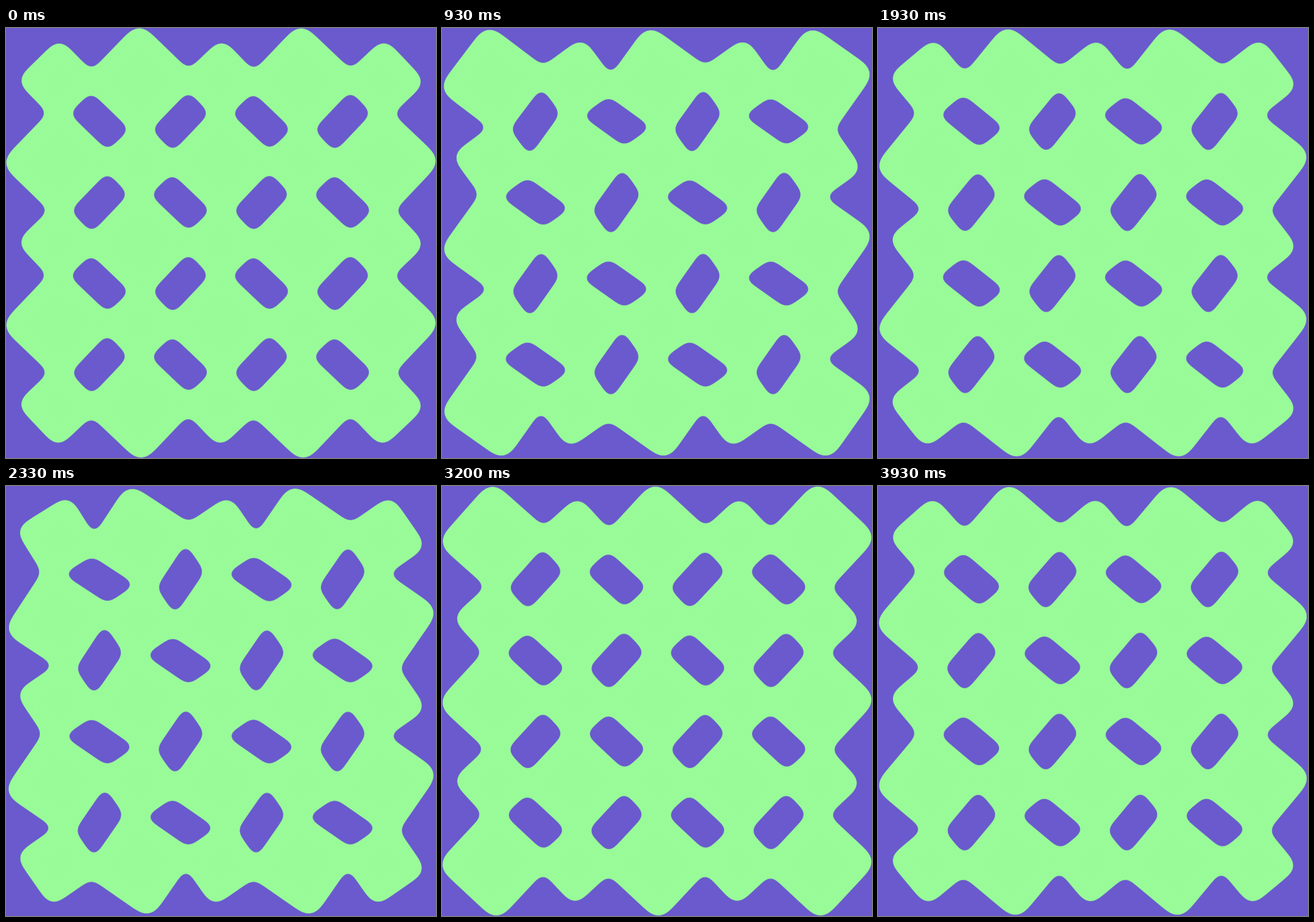
Animation of 748x748 px, one loop 4000 ms. Source, as an HTML page without scripts:

```html
<!DOCTYPE html>
<html lang="en">
<head>
<meta charset="utf-8">
<title>Swaying squares</title>
<style>
  html, body {
    margin: 0;
    width: 100%;
    height: 100%;
    overflow: hidden;
    background: #6a5acd;
  }
  .stage {
    position: relative;
    width: 100%;
    height: 100%;
    overflow: hidden;
    contain: strict;
  }
  svg { position: absolute; width: 0; height: 0; }
  .grid {
    position: absolute;
    left: 22px;
    top: 22px;
    display: grid;
    grid: repeat(5, 140.8px) / repeat(5, 140.8px);
    place-items: center;
    filter: url(#goo);
  }
  /* --dir: sway direction, --lead: head start near the top left */
  i {
    --dir: 1;
    --lead: 1ms;
    width: 122px;
    height: 122px;
    border-radius: 15%;
    background: #98fb98;
    animation: sway 4s cubic-bezier(.364, 0, .636, 1) calc(-3918ms - var(--lead)) infinite;
  }
  i:nth-child(odd) { --dir: -1; }
  i:nth-child(1) { --lead: 30ms; }
  i:nth-child(4n + 2):nth-child(-n + 6) { --lead: 17ms; }
  i:nth-child(4n + 3):nth-child(-n + 11) { --lead: 9ms; }
  i:nth-child(4n + 4):nth-child(-n + 16) { --lead: 5ms; }

  /* squares grow as they turn one way and shrink the other way */
  @keyframes sway {
    0%, 50.8%, 100% {
      transform: rotate(calc(var(--dir) * 45deg)) scale(calc(1 + var(--dir) * .166));
    }
    25.9% {
      transform: rotate(calc(var(--dir) * -42deg)) scale(calc(1 - var(--dir) * .155));
    }
    75.7% {
      transform: rotate(calc(var(--dir) * -45deg)) scale(calc(1 - var(--dir) * .166));
    }
  }
</style>
</head>
<body>
<div class="stage">
  <svg aria-hidden="true">
    <filter id="goo" color-interpolation-filters="sRGB">
      <feGaussianBlur stdDeviation="10"/>
      <feColorMatrix values="1 0 0 0 0  0 1 0 0 0  0 0 1 0 0  0 0 0 18 -7"/>
    </filter>
  </svg>
  <div class="grid">
    <i></i><i></i><i></i><i></i><i></i>
    <i></i><i></i><i></i><i></i><i></i>
    <i></i><i></i><i></i><i></i><i></i>
    <i></i><i></i><i></i><i></i><i></i>
    <i></i><i></i><i></i><i></i><i></i>
  </div>
</div>
</body>
</html>
```
